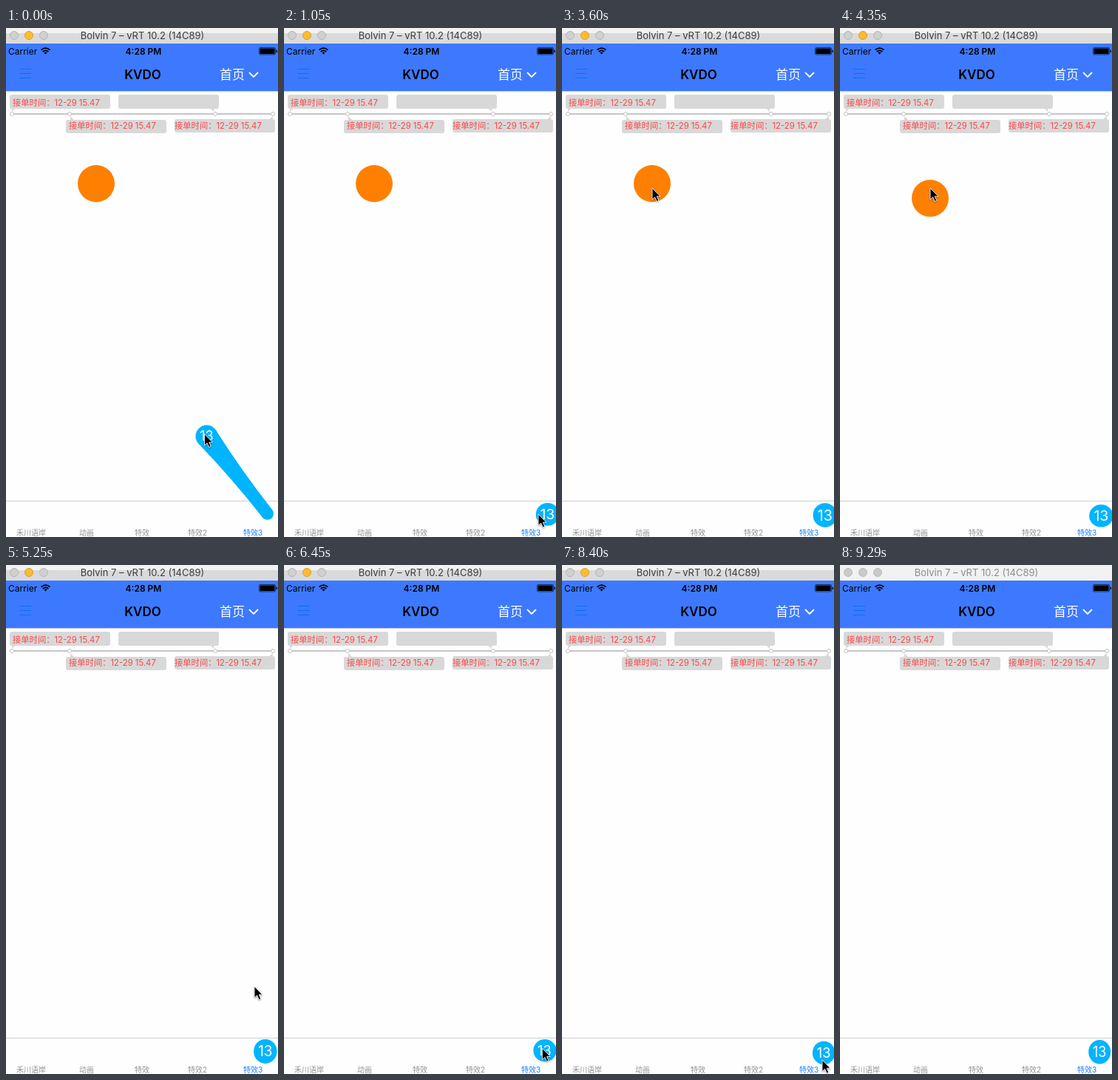
These frames come from a looping animation (368x687 px, 9.39 s). An HTML page:

```html
<!DOCTYPE html>
<html lang="zh-CN">
<head>
<meta charset="utf-8">
<style>
html, body { margin: 0; width: 100%; height: 100%; overflow: hidden; background: #fefefe; }
svg { display: block; width: 368px; height: 687px; }
text { font-family: Inter, "Noto Sans CJK SC", "Noto Sans CJK", sans-serif; }
.mid { text-anchor: middle; }
#titlebar rect { fill: #f2f2f2; }
#titlebar .shade { fill: #dadada; }
#titlebar text { fill: #3c3c3c; font-size: 13px; }
#titlebar circle { fill: #d0d0d0; stroke: #b4b4b4; }
#titlebar .amber { fill: #fdbc2e; stroke: #dd9d2c; }
#titlebar.idle .shade { fill: #f2f2f2; }
#titlebar.idle text { fill: #8c8c8c; }
#titlebar.idle circle { fill: #cacaca; stroke: #bababa; }
#notes { fill: #d8d8d8; }
#notes text { fill: #fb4848; font-size: 11.3px; }
#tabs text { fill: #929292; font-size: 10px; text-anchor: middle; }
#tabs .on { fill: #1a80ff; }
#cursor { filter: drop-shadow(0 1px 1px rgba(0, 0, 0, .4)); }
</style>
</head>
<body>
<svg viewBox="0 0 368 687">
  <rect width="368" height="687" fill="#fefefe"/>
  <g id="titlebar">
    <rect width="368" height="21"/>
    <rect class="shade" y="7" width="368" height="14"/>
    <circle cx="11" cy="10" r="5.5"/>
    <circle class="amber" cx="31" cy="10" r="5.5"/>
    <circle cx="51" cy="10" r="5.5"/>
    <text class="mid" x="184.5" y="15">Bolvin 7 – vRT 10.2 (14C89)</text>
  </g>

  <rect y="21" width="368" height="64" fill="#3d79fe"/>
  <rect y="85" width="368" height="1" fill="#c8cddc"/>
  <text x="3" y="35.5" font-size="12">Carrier</text>
  <g fill="none" stroke="#000" stroke-width="1.7">
    <path d="M47.5 29.7Q53.5 24.6 59.5 29.7M49.7 32Q53.5 28.8 57.3 32"/>
    <path d="M51.3 33.2Q53.5 31.6 55.7 33.2L53.5 35.6Z" fill="#000" stroke="none"/>
  </g>
  <text class="mid" x="186" y="35.5" font-size="12" font-weight="600">4:28 PM</text>
  <rect x="342.5" y="26.5" width="22" height="9.5" rx="1.5" fill="none" stroke="#000" stroke-opacity=".6"/>
  <rect x="343.5" y="27.5" width="20" height="7.5" rx=".5"/>
  <rect x="365.5" y="29.5" width="1.3" height="3.5" rx=".6"/>
  <path d="M18 55.5H34M18 61.5H34M18 67.5H34" stroke="#0a6cff"/>
  <text class="mid" x="185" y="69" font-size="17" font-weight="600">KVDO</text>
  <text x="289" y="68.8" font-size="17" fill="#fff">首页</text>
  <path d="M329 60L335 66L341 60" fill="none" stroke="#fff" stroke-width="1.8"/>

  <g id="notes">
    <rect x="5" y="90" width="136" height="19" rx="3"/>
    <rect x="152" y="90" width="136" height="19" rx="3"/>
    <rect x="81" y="124" width="136" height="18" rx="3"/>
    <rect x="228" y="123" width="136" height="18" rx="3"/>
    <path d="M8 108V113L13 108ZM276 108H281V113ZM87 119V125H93ZM361 119V124H355Z"/>
    <path d="M8 116H361" stroke="#c6c6c6" stroke-width="2"/>
    <g fill="#fff" stroke="#c2c2c2">
      <circle cx="8" cy="116" r="2.5"/><circle cx="86" cy="116" r="2.5"/>
      <circle cx="283" cy="116" r="2.5"/><circle cx="361" cy="116" r="2.5"/>
    </g>
    <text x="9" y="104.5">接单时间：12-29 15.47</text>
    <text x="85" y="136">接单时间：12-29 15.47</text>
    <text x="228" y="135.5">接单时间：12-29 15.47</text>
  </g>

  <circle id="ball" cx="122" cy="210" r="25" fill="#ff8000"/>

  <g id="tabs">
    <rect y="638" width="368" height="49" fill="#fefefe"/>
    <rect y="638" width="368" height="1" fill="#cecece"/>
    <text x="34" y="684.5">禾川语岸</text>
    <text x="109" y="684.5">动画</text>
    <text x="184" y="684.5">特效</text>
    <text x="259" y="684.5">特效2</text>
    <text class="on" x="334" y="684.5">特效3</text>
  </g>

  <g fill="#00b4ff">
    <circle id="tail" cx="353.7" cy="655.5"/>
    <path id="neck"/>
    <g id="badge">
      <circle r="15"/>
      <text class="mid" y="6.4" font-size="18" fill="#fff">13</text>
    </g>
  </g>
  <path id="cursor" d="M0 0V15.5L3.6 12.2L6.2 18L8.8 16.9L6.3 11.2H11Z" stroke="#fff" stroke-width=".9" stroke-linejoin="round"/>
</svg>
<script>
const LOOP = 9390, R = 15, HOME = [353.7, 655.5];
const SPRING = 500, FALL = 4150, BLUR = 9200;
const drags = [[0, 300], [1500, 2500], [6450, 6770]];   // grab, release
const route = [                                         // time, x, y of the pointer tip
  [0, 268.5, 548], [300, 268.5, 548], [800, 346, 657], [1050, 344, 656],
  [1500, 350, 653], [2100, 286, 577], [2400, 249.5, 556], [2520, 250, 556],
  [3150, 171, 271], [3600, 122, 216], [4400, 122, 216], [5250, 336, 568.5],
  [5700, 346, 650], [6450, 350, 653], [6740, 153, 439], [7050, 151, 439],
  [7200, 254, 558.5], [7350, 352, 668], [8500, 352, 668], [8800, 382, 650]
];
const $ = id => document.getElementById(id);

function pointer(t) {
  const i = route.findIndex(p => p[0] > t);
  if (i < 0) return route.at(-1).slice(1);
  const a = route[i - 1], b = route[i], k = (t - a[0]) / (b[0] - a[0]);
  return [1, 2].map(n => a[n] + (b[n] - a[n]) * k);
}

const held = t => pointer(t).map(v => v + 3);

function bubble(t) {
  const [, release] = drags.findLast(d => d[0] <= t);
  if (t < release) return { pos: held(t), sx: 1, sy: 1, dragged: true };
  const s = (t - release) / 1000, idle = s - SPRING / 1000;
  if (idle < 0) {
    const k = Math.exp(-13.8 * s) * (Math.cos(31.6 * s) + .436 * Math.sin(31.6 * s));
    const from = held(release);
    return { pos: HOME.map((h, n) => h + (from[n] - h) * k), sx: 1, sy: 1 };
  }
  const a = idle * 2 * Math.PI / 5;
  const swell = period => 1.05 - .05 * Math.cos(2 * Math.PI * idle / period);
  return { pos: [HOME[0] + 3 * Math.cos(a), HOME[1] + 3 * Math.sin(a)], sx: swell(1), sy: swell(1.5) };
}

function drawNeck([x, y], dragged) {
  const [hx, hy] = HOME, d = Math.hypot(x - hx, y - hy), r = R - d / 20;
  const shown = dragged && r > 6;
  $('tail').setAttribute('r', shown ? r : 0);
  if (!shown || d < 1) return $('neck').setAttribute('d', '');
  const ux = (x - hx) / d, uy = (y - hy) / d;
  // along the axis by m, across it by w
  const at = (m, w) => `${hx + ux * m - uy * w} ${hy + uy * m + ux * w}`;
  $('neck').setAttribute('d',
    `M${at(0, r)}Q${at(d / 2, r)} ${at(d, R)}L${at(d, -R)}Q${at(d / 2, -r)} ${at(0, -r)}Z`);
}

function draw(t) {
  const { pos, sx, sy, dragged } = bubble(t);
  drawNeck(pos, dragged);
  $('badge').setAttribute('transform', `translate(${pos}) scale(${sx} ${sy})`);
  $('cursor').setAttribute('transform', `translate(${pointer(t)})`);
  const fall = Math.max(0, t - FALL) / 1000;
  $('ball').setAttribute('cy', Math.min(800, 210 + 490 * fall * fall));
  $('titlebar').classList.toggle('idle', t >= BLUR);
}

const start = performance.now();
function tick() {
  draw((performance.now() - start) % LOOP);
  requestAnimationFrame(tick);
}
tick();
</script>
</body>
</html>
```
